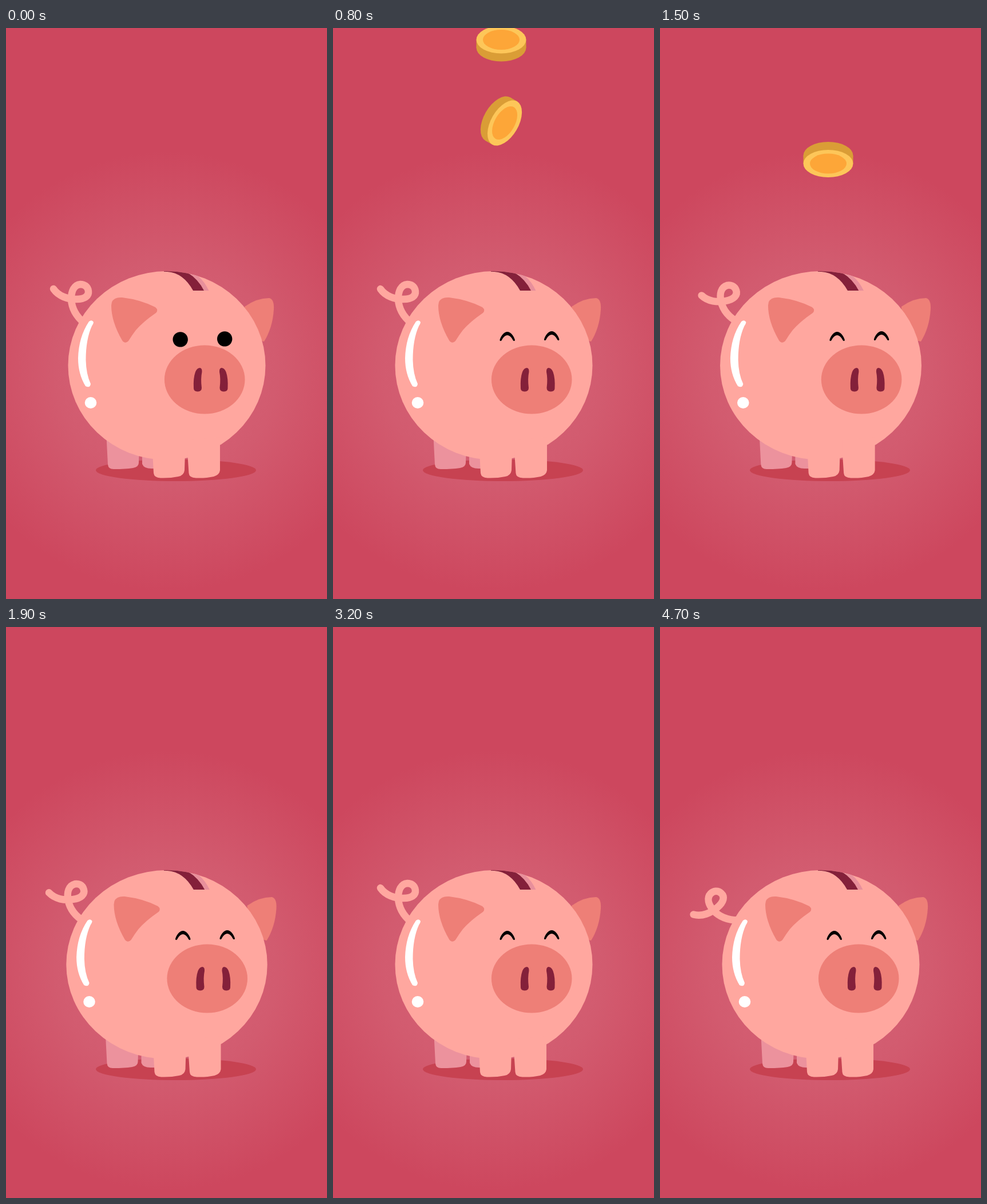
Write an HTML page with a canvas that moves like this. It is 561 by 998 pixels and loops after 4.8 s.

```html
<!DOCTYPE html>
<html lang="en">
<head>
<meta charset="utf-8">
<title>Piggy bank</title>
<style>
  html, body { margin: 0; width: 100%; height: 100%; overflow: hidden; background: #cd475e; }
  canvas { display: block; width: 561px; height: 998px; }
</style>
</head>
<body>
<canvas id="stage" width="561" height="998"></canvas>
<script>
const ctx = document.getElementById('stage').getContext('2d');
const LOOP = 4800, STEP = 100;
const SKIN = '#ffa79f', ROSE = '#ee7f77', BACK = '#ec929d', WINE = '#84203a';
const CX = 281, CY = 590;

const shape = d => new Path2D(d);
const art = {
  backLegs: shape('M175 700 L176 724 L178 763 Q179 772 190 771 Q208 771 222 769 Q232 767 232 760 L234 700 Z M238 740 V762 Q241 770 254 770 H270 V740 Z'),
  frontLegs: shape('M256 740 L258 778 Q259 786 270 786.5 Q287 787 301 784 Q311 782 312 773 L313 740 Z M317 740 L319.5 778 Q320 786 332 786.5 Q350 787 363 784 Q373 781 374 773 L374 715 L317 720 Z'),
  farEar: shape('M417 487 Q438 472 460 472 Q469 474 468 492 Q466 524 451 548 L420 540 Z'),
  nearEar: shape('M185 479 Q189 470 203 471 Q236 475 261 488 Q267 493 262 498 Q240 513 227 528 Q220 537 214 547 Q208 553 203 546 Q184 513 184 485 Z'),
  tail: shape('M83 456 C92 469 108 474 122 474 C138 474.5 145 468 144 460 C143 451 136 448 130 448 C119 449 114 460 114 474 C115 492 124 505 136 515'),
  slot: shape('M276 420 H318 V428 Q336 439 346 459 H327 Q310 428 282 426 L276 426 Z'),
  slotEdge: shape('M318 420 H336 V434 Q347 443 354.5 459 H346 Q336 439 318 428 Z'),
  shine: shape('M145 513 Q150 509 153 514 Q153 517 150 521 Q139.5 544 139.5 580 Q140 605 148 622 Q147 630 139 626 Q126 605 126 577 Q127 540 145 513 Z'),
  nostril: shape('M328 630 Q327 612 331 601 Q334 594 339 594 Q343 595 342.5 601 Q340 613 342 629 Q342 635 335 635.5 Q328 635 328 630 Z'),
  openTop: shape('M-50 -100 H611 V459 H327 Q310 428 282 426 L262 426 H-50 Z')
};

// Right half of an eye outline, from top to bottom, mirrored when drawn
const OPEN = [[0, -13.2], [7.3, -13.2], [13.2, -7.3], [13.2, 0], [13.2, 1.5], [12.9, 3],
              [12.4, 4.4], [10.6, 9.8], [5.8, 13.2], [0, 13.2]];
const HAPPY = [[0, -13.3], [6, -13.2], [10.5, -7], [13.2, 0.5], [13.4, 2.8], [11.4, 3.2],
               [10.2, 1.8], [7, -4], [4, -7.2], [0, -7.4]];

const clamp = v => Math.max(0, Math.min(1, v));
const lerp = (a, b, u) => a + (b - a) * u;
const ease = (t, from, to) => {
  const u = clamp((t - from) / (to - from));
  return u * u * (3 - 2 * u);
};

function fill(path, color) {
  ctx.fillStyle = color;
  ctx.fill(path);
}

function oval(x, y, rx, ry, color) {
  ctx.fillStyle = color;
  ctx.beginPath();
  ctx.ellipse(x, y, rx, ry, 0, 0, 2 * Math.PI);
  ctx.fill();
}

function group(draw) {
  ctx.save();
  draw();
  ctx.restore();
}

function shifted(dx, draw) {
  group(() => { ctx.translate(dx, 0); draw(); });
}

function widened(k, draw) {
  group(() => {
    ctx.translate(CX, 0);
    ctx.scale(k, 1);
    ctx.translate(-CX, 0);
    draw();
  });
}

function backdrop() {
  const g = ctx.createRadialGradient(CX, 600, 0, CX, 600, 385);
  g.addColorStop(0, '#d7667a');
  g.addColorStop(0.5, '#d25b6f');
  g.addColorStop(1, '#cd475e');
  ctx.fillStyle = g;
  ctx.fillRect(0, 0, 561, 998);
  oval(297, 773, 140, 19, '#c74251');
}

function eye(x, y, smile) {
  const half = OPEN.map((p, i) => [lerp(p[0], HAPPY[i][0], smile), lerp(p[1], HAPPY[i][1], smile)]);
  const pts = half.concat(half.slice(0, -1).reverse().map(p => [-p[0], p[1]]));
  group(() => {
    ctx.translate(x, y);
    ctx.beginPath();
    ctx.moveTo(...pts[0]);
    for (let i = 1; i < pts.length; i += 3) ctx.bezierCurveTo(...pts[i], ...pts[i + 1], ...pts[i + 2]);
    ctx.fillStyle = '#000';
    ctx.fill();
  });
}

function tail(t) {
  const swing = Math.max(0, Math.min(t, 3492) - 792) / 600;
  group(() => {
    ctx.translate(133, 512);
    ctx.rotate(-41 * Math.PI / 180 * (1 - Math.cos(2 * Math.PI * swing)) / 2);
    ctx.translate(-133, -512);
    ctx.strokeStyle = SKIN;
    ctx.lineWidth = 12.5;
    ctx.lineCap = 'round';
    ctx.stroke(art.tail);
  });
}

function coin(age) {
  const u = age / 200;
  if (u < -0.6 || u > 3.2) return;
  const turn = u < 2 ? 120 * u : 240 + 22 * (u - 2);
  group(() => {
    ctx.translate(294, 27.5 + 135 * u);
    ctx.rotate(turn * Math.PI / 180);
    oval(0, 7, 43.5, 24, '#da9d36');
    ctx.fillRect(-43.5, -7, 87, 14);
    oval(0, -7, 43.5, 24, '#fdc659');
    oval(0, -7, 32, 17.5, '#fda638');
  });
}

function pig(t) {
  const back = ease(t, 2750, 3200);
  const swell = (ease(t, 800, 1150) + 0.1 * (ease(t, 900, 1200) - ease(t, 1400, 1900))) * (1 - back);
  const k = 1 + 0.0185 * swell, lean = 4.5 * swell, stance = 1.5 * swell - back;

  shifted(-stance, () => fill(art.backLegs, BACK));
  shifted(lean, () => fill(art.farEar, ROSE));
  tail(t);
  widened(k, () => oval(CX, CY, 172.5, 165, SKIN));
  shifted(stance, () => fill(art.frontLegs, SKIN));

  widened(k, () => {
    group(() => {
      ctx.beginPath();
      ctx.ellipse(CX, CY, 172.5, 165, 0, 0, 2 * Math.PI);
      ctx.clip();
      fill(art.slotEdge, '#e88f9b');
      fill(art.slot, WINE);
    });
    fill(art.shine, '#fff');
  });
  oval(CX - 133 * k, 655, 10.3, 10, '#fff');

  shifted(lean, () => {
    const smile = ease(t, 0, 500);
    fill(art.nearEar, ROSE);
    eye(304.7, 544.4, smile);
    eye(382.2, 543.4, smile);
    oval(347.2, 614.5, 70.3, 60, ROSE);
    fill(art.nostril, WINE);
    ctx.translate(715.5, 0);
    ctx.scale(-1, 1);
    fill(art.nostril, WINE);
  });

  group(() => {
    ctx.clip(art.openTop);
    for (const start of [600, 800, 1200]) coin(t - start);
  });
}

function frame(now) {
  const t = Math.floor((now - begin) % LOOP / STEP) * STEP;
  backdrop();
  pig(t);
  requestAnimationFrame(frame);
}

const begin = performance.now();
frame(begin);
</script>
</body>
</html>
```
